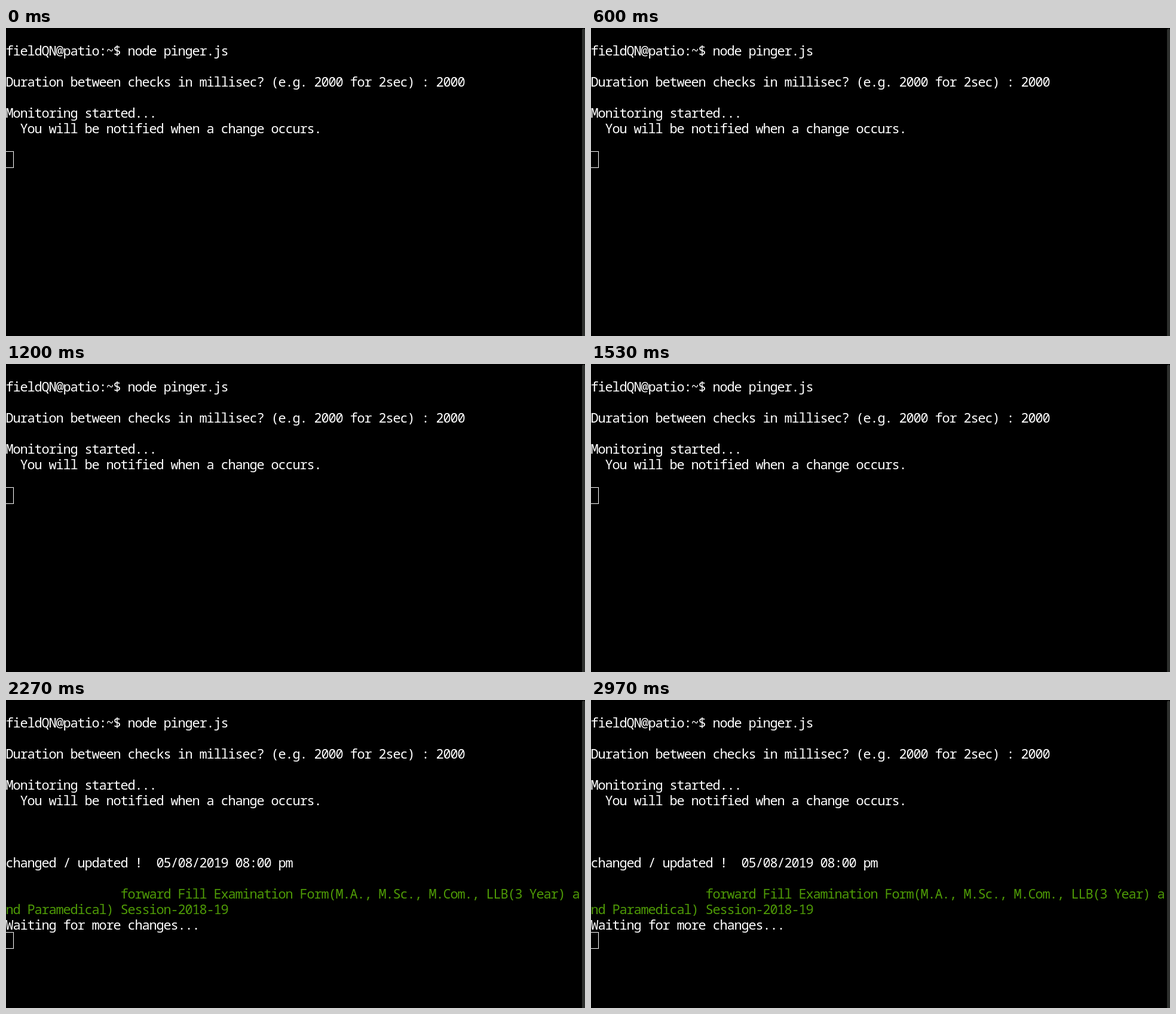
An HTML page that plays this animation: 969 px wide and 515 px high, repeating every 3010 ms.

```html
<!DOCTYPE html>
<html lang="en">
<head>
<meta charset="utf-8">
<title>Terminal monitor</title>
<style>
  html, body { margin: 0; width: 100%; height: 100%; overflow: hidden; background: #000; }
  svg { display: block; }
  text {
    font: 500 22px "Noto Sans Mono", "DejaVu Sans Mono", monospace;
    letter-spacing: -1.2px;
    white-space: pre;
    fill: #fff;
  }
  .notice { fill: #4e9a06; }
</style>
</head>
<body>
<svg width="969" height="515" viewBox="0 0 969 515">
  <rect width="969" height="515"/>
  <g id="intro"></g>
  <g id="update"></g>
  <rect id="cursor" x="-0.5" width="13" height="27" fill="none" stroke="#fff"/>
  <path fill="#2e302e" d="M964 515V4Q964 1 966.5 1Q969 1 969 4V515Z"/>
</svg>
<script>
const LOOP = 3010;
const UPDATE_AT = 1730;
const CELL = 12;
const ROW = 26;
const GLYPH_SHIFT = -0.6; // centres each glyph in its cell

const byId = id => document.getElementById(id);
const intro = byId("intro"), update = byId("update"), cursor = byId("cursor");

function addLine(group, row, content, column = 0, className = "") {
  const line = document.createElementNS("http://www.w3.org/2000/svg", "text");
  line.setAttribute("x", column * CELL + GLYPH_SHIFT);
  line.setAttribute("y", 20 + row * ROW);
  line.setAttribute("class", className);
  line.textContent = content;
  group.append(line);
}

addLine(intro, 1, "fieldQN@patio:~$ node pinger.js");
addLine(intro, 3, "Duration between checks in millisec? (e.g. 2000 for 2sec) : 2000");
addLine(intro, 5, "Monitoring started...");
addLine(intro, 6, "You will be notified when a change occurs.", 2);

addLine(update, 10, "changed / updated !  05/08/2019 08:00 pm");
addLine(update, 12, "forward Fill Examination Form(M.A., M.Sc., M.Com., LLB(3 Year) a", 16, "notice");
addLine(update, 13, "nd Paramedical) Session-2018-19", 0, "notice");
addLine(update, 14, "Waiting for more changes...");

function render(time) {
  const updated = time >= UPDATE_AT;
  update.setAttribute("visibility", updated ? "visible" : "hidden");
  cursor.setAttribute("y", (updated ? 15 : 8) * ROW - 1.5);
}

const start = performance.now();
function tick() {
  render((performance.now() - start) % LOOP);
  requestAnimationFrame(tick);
}
render(0);
requestAnimationFrame(tick);
</script>
</body>
</html>
```
